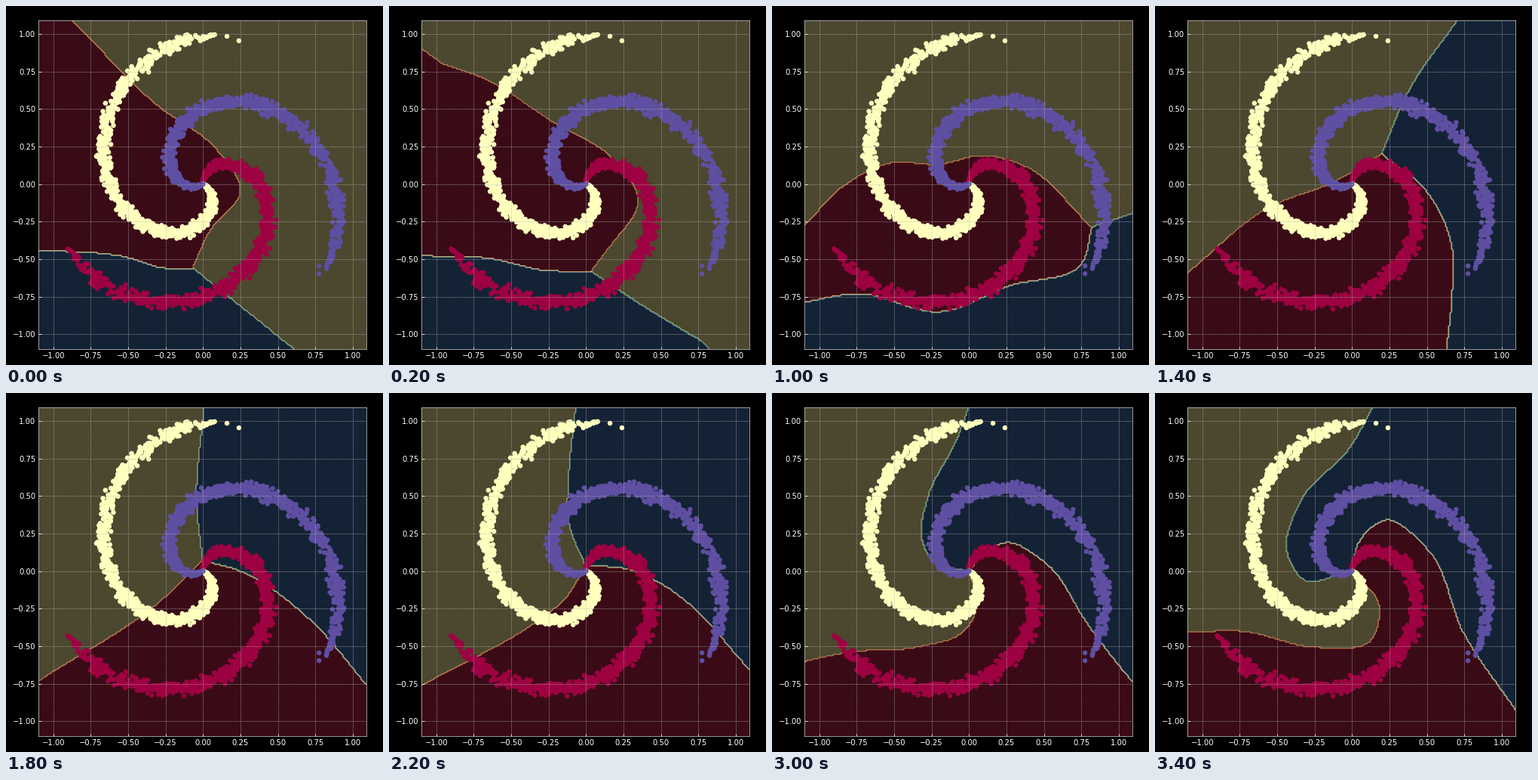
These frames come from a looping animation (500x475 px, 4400 ms). A matplotlib script:

```python
import numpy as np
import matplotlib.pyplot as plt
from matplotlib.animation import FuncAnimation
from matplotlib.path import Path

W, H, DPI = 500, 475, 72
SIDE = 434.8
STEP_MS, FRAMES = 200, 22
FAR = 4.0
LIMITS = (-1.1, 1.09)
TURN = 2 * np.pi

plt.rcParams.update({"font.family": "DejaVu Sans", "font.size": 10})


def spline(points, n=90):
    """Smooth curve through a few points, evenly sampled along its length."""
    p = np.array(points) / 100
    s = np.r_[0, np.cumsum(np.hypot(*np.diff(p, axis=0).T))]
    slope = np.gradient(p, s, axis=0)
    u = np.linspace(0, s[-1], n)
    i = np.clip(np.searchsorted(s, u, "right") - 1, 0, len(s) - 2)
    h = (s[i + 1] - s[i])[:, None]
    t = (u - s[i])[:, None] / h
    return ((1 + 2 * t) * (1 - t) ** 2 * p[i] + t * (1 - t) ** 2 * h * slope[i]
            + t * t * (3 - 2 * t) * p[i + 1] + t * t * (t - 1) * h * slope[i + 1])


def pose(meeting, *borders):
    """Borders cream/red, red/blue, blue/cream, running out from one point."""
    return [spline([meeting, *border]) for border in borders]


# Key points in hundredths of a unit; each border ends just outside the plot.
poses = {
    0: pose((-7, -56),
            [(4, -32), (25, -4), (10, 22), (-30, 52), (-89, 111)],
            [(-26, -56), (-50, -49), (-111, -44)],
            [(63, -112)]),
    3: pose((24, -63),
            [(59, -36), (35, 7), (-8, 25), (-70, 43), (-111, 19)],
            [(0, -62), (-22, -66), (-57, -56), (-111, -55)],
            [(60, -79), (111, -94)]),
    5: pose((82, -29),
            [(37, 12), (10, 19), (-20, 13), (-53, 14), (-82, 0), (-111, -29)],
            [(76, -52), (26, -68), (-18, -85), (-75, -73), (-111, -79)],
            [(111, -19)]),
    7: pose((20, 20),
            [(-11, 2), (-56, -16), (-111, -60)],
            [(50, -5), (66, -38), (67, -70), (63, -112)],
            [(38, 62), (72, 111)]),
    9: pose((0, 7),
            [(-26, -18), (-111, -74)],
            [(25, 0), (70, -31), (111, -78)],
            [(-4, 45), (1, 111)]),
    13: pose((0, 0),
             [(-10, -27), (-22, -36), (-111, -80)],
             [(30, 4), (50, -2), (111, -57)],
             [(-18, 25), (-19, 60), (-14, 111)]),
    17: pose((0, 0),
             [(18, -22), (13, -46), (-22, -51), (-75, -40), (-111, -41)],
             [(5, 20), (22, 34), (50, 15), (75, -42), (111, -95)],
             [(-33, -5), (-43, 12), (-35, 45), (0, 84), (15, 111)]),
}


def end_angle(line):
    """Direction of the outer end, kept in one turn so that it never jumps."""
    x, y = line[-1]
    return (np.arctan2(y, x) - 1.9) % TURN + 1.9


def borders_at(frame):
    keys = sorted(poses)
    frame = min(frame, keys[-1])
    k = min(np.searchsorted(keys, frame, "right") - 1, len(keys) - 2)
    t = (frame - keys[k]) / (keys[k + 1] - keys[k])
    return [((1 - t) * a + t * b, (1 - t) * end_angle(a) + t * end_angle(b))
            for a, b in zip(poses[keys[k]], poses[keys[k + 1]])]


def wedge(first, second):
    """Region between two borders, closed by an arc far outside the plot."""
    (line_a, angle_a), (line_b, angle_b) = first, second
    arc = np.linspace(angle_b, angle_a, 40)
    rim = FAR * np.column_stack([np.cos(arc), np.sin(arc)])
    return Path(np.vstack([line_a[::-1], line_b, rim, line_a[-1:]]))


mesh = np.arange(220) * 0.01 - 1.1
xx, yy = np.meshgrid(mesh, mesh)
cells = np.column_stack([xx.ravel(), yy.ravel()])


def classes_at(frame):
    cream_red, red_blue, blue_cream = borders_at(frame)
    z = np.ones(len(cells))
    z[wedge(red_blue, blue_cream).contains_points(cells)] = 2
    z[wedge(cream_red, red_blue).contains_points(cells)] = 0
    return z.reshape(xx.shape)


def spiral_arm(arm, rng, count=1000):
    r = np.linspace(0, 1, count)
    noise = np.clip(rng.normal(0, 0.1, count), -0.26, 0.26)
    noise = np.minimum(noise, 0.08 + 2 * (1 - r))  # the tip tapers off
    a = TURN / 3 * (arm + 2 * r) + noise
    return np.column_stack([r * np.sin(a), r * np.cos(a)])


fig = plt.figure(figsize=(W / DPI, H / DPI), dpi=DPI, facecolor="black")
ax = fig.add_axes([42.9 / W, 21 / H, SIDE / W, SIDE / H], facecolor="black")
ticks = np.arange(-1, 1.01, 0.25)
ax.set(xticks=ticks, yticks=ticks)
ax.tick_params(direction="in", color="white", labelcolor="white")
ax.grid(color="#b2b2b2", linestyle="--", linewidth=0.5)
for spine in ax.spines.values():
    spine.set_edgecolor("#bcbcbc")

rng = np.random.default_rng(4)
strays = [(.16, .985), (.24, .955), (.775, -.545), (.775, -.597)]
dots = np.vstack([spiral_arm(arm, rng) for arm in range(3)] + [strays])
labels = np.r_[np.repeat([0, 1, 2], 1000), 1, 1, 2, 2]
ax.scatter(*dots.T, c=labels, s=20, linewidths=2, cmap="Spectral", zorder=1)

regions = None


def draw(frame):
    global regions
    if regions is not None:
        regions.remove()
    regions = ax.contourf(xx, yy, classes_at(frame), levels=np.linspace(0, 2, 9),
                          cmap="Spectral", alpha=0.3, zorder=0.5)
    ax.set(xlim=LIMITS, ylim=LIMITS)
    return []


anim = FuncAnimation(fig, draw, frames=FRAMES, interval=STEP_MS,
                     init_func=lambda: draw(0), repeat=True, repeat_delay=0)
plt.show()
```
